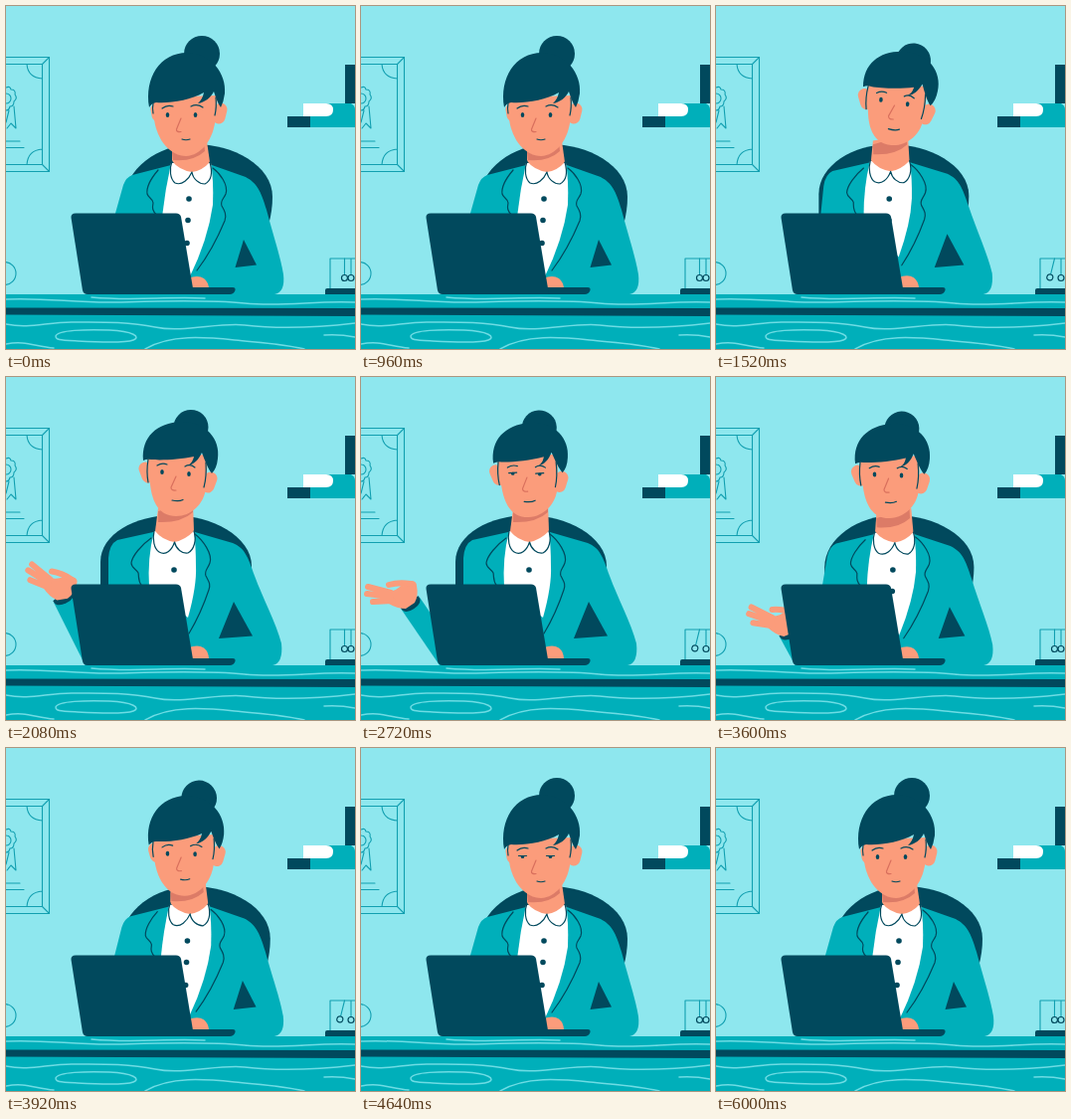
Recreate the animation shown at these times as an HTML page. Size 351 by 345 pixels, loop 6080 ms.

```html
<!DOCTYPE html>
<html lang="en">
<head>
<meta charset="utf-8">
<title>At the desk</title>
<style>
  html, body { margin: 0; width: 100%; height: 100%; overflow: hidden; background: #8ee7ee; }
  svg { display: block; width: 351px; height: 345px; }
  path { stroke-linecap: round; stroke-linejoin: round; }
  .dark { fill: #01495d; }
  .teal { fill: #00afba; }
  .skin { fill: #fb9c7b; }
  .shade { fill: #dc7b67; }
  .white { fill: #fff; }
  .line { fill: none; stroke: #01495d; stroke-width: 1.2; }
  .thin { fill: none; stroke: #129fb0; stroke-width: 1.1; }
  .grain { fill: none; stroke: #6ddce4; stroke-width: 1.5; }
  .nose { fill: none; stroke: #d9705d; stroke-width: 1.2; }
  .ear { fill: none; stroke: #fb9c7b; stroke-width: 13; }
  .button { fill: none; stroke: #01495d; stroke-width: 5.6; }
  .finger { fill: none; stroke: #fb9c7b; stroke-width: 6; }
</style>
</head>
<body>
<svg viewBox="0 0 351 345">
  <!-- certificate and globe -->
  <g class="thin">
    <path d="M0 51.500H43.500V166.500H0M0 58.500H36.500V159.500H0M36.500 58.500L43.500 51.500M36.500 159.500L43.500 166.500M21 58.500Q22 72 36.500 73M21 159.500Q22 145 36.500 144"/>
    <path d="M0 82q4-2 5 2q5 0 4 5q3 4-1 7q0 5-4 5q-1 4-4 4M3 105L0 117M8 101L10 123L5 118L1 123M0 136H14M0 142.500H18"/>
    <circle cx="0" cy="93" r="5"/>
    <circle cx="-1.500" cy="269" r="11.500"/>
  </g>
  <!-- shelf -->
  <path class="dark" d="M341 59H351V98H341ZM283 111H307V122H283Z"/>
  <path class="teal" d="M306 111H351V122H306ZM322 98H347Q351 100 351 104V111H322Z"/>
  <path class="white" d="M299 98H322Q329 98 329 104.500T322 111H299Z"/>
  <!-- cradle -->
  <path class="thin" d="M326 284V254H351M347 254V270"/>
  <circle class="line" cx="347" cy="273.500" r="3"/>
  <g id="ball">
    <path class="thin" d="M340.500 254V270"/>
    <circle class="line" cx="340.500" cy="273.500" r="3"/>
  </g>
  <path class="dark" d="M323 284H351V290H321V286Q321 284 323 284Z"/>

  <g id="body"></g>
  <g id="head"></g>
  <path id="sleeve" fill="none" stroke="#00afba" stroke-width="22" style="stroke-linecap:butt"/>
  <path id="cuff" class="dark" d="M-2 -11Q6 -11 6 0T-2 11Q-6 0 -2 -11Z"/>
  <g id="hand">
    <path class="skin" d="M6 -18Q8 -8 4 -1L-5 5Q-14 5 -22 0L-26 -11Q-12 -13 -8 -21L2 -23Q6 -22 6 -18Z"/>
    <path class="finger" d="M-20 -11L-43 -17M-20 -7L-44 -10M-18 -3L-38 -2M0 -20Q-12 -22 -22 -19"/>
  </g>
  <path id="typing" class="skin" d="M183 274Q193 270 199 274Q204 278 204 285H183Z"/>

  <!-- laptop -->
  <path class="dark" d="M84 283H228Q231 283 230.500 286Q229 290 225 290H84Z"/>
  <path class="dark" d="M70 208.500H171Q175 208.500 176 212L189 290H82Q78 290 77 286L65.500 213Q65 208.500 70 208.500Z"/>

  <!-- desk -->
  <path class="teal" d="M0 290H351V345H0Z"/>
  <path class="dark" d="M0 303.500L351 304V312L0 310.500Z"/>
  <g class="grain">
    <path d="M0 295C40 293 70 299 110 298S200 295 240 299S310 296 351 298M86 293C130 297 160 292 200 294"/>
    <path d="M50 332C52 326 80 325 104 326S136 333 128 336S90 338 72 337S50 336 50 332Z"/>
    <path d="M0 320C24 325 40 318 66 318S122 317 150 323S214 318 240 321S300 325 351 319M0 340C20 336 30 343 48 344M140 345C165 330 200 333 230 336S280 340 300 345M320 331Q336 330 351 333"/>
  </g>
</svg>
<script>
const LOOP = 6080;
const $ = id => document.getElementById(id);
const clamp = v => Math.max(0, Math.min(1, v));
const parts = [];

// Blend two paths that share the same commands; arc flags stay whole.
function mix(a, b, t) {
  const to = b.match(/-?[\d.]+/g);
  let i = 0;
  return a.replace(/-?[\d.]+/g, n => +(+n + (to[i++] - n) * t).toFixed(2));
}

function part(group, style, from, to) {
  const el = document.createElementNS("http://www.w3.org/2000/svg", "path");
  el.setAttribute("class", style);
  $(group).append(el);
  parts.push({ el, group, from, to });
  return el;
}

// Body: leaning over the keyboard, then sitting back.
part("body", "dark",
  "M119 215V195C119 165 152 139 190 139S268 160 268 192Q268 206 264 220Z",
  "M95 215V186C95 158 130 139 168 139S247 160 247 190Q247 204 243 220Z");
part("body", "teal",
  "M166 160L127 170Q121 172 118 180L109 212L112 290H270Q281 288 279 270C277 255 268 228 262 205C256 185 252 178 241 172L207 160Z",
  "M148 156L112 164Q104 168 103 182L103 212L106 290H268Q279 288 277 268C272 248 258 222 250 200C243 180 240 172 228 167L190 156Z");
part("body", "white",
  "M166 158Q160 185 157 212L185 272Q203 235 208 200Q209 175 206 158Z",
  "M149 155Q142 182 144 212L183 242Q192 210 191 190Q191 170 189 155Z");
part("body", "skin",
  "M167 142L202 136L205 157Q197 166 187 167Q174 165 167 156Z",
  "M153 132L188 126L189 155Q180 164 169.500 166Q157 164 150 155Z");
part("body", "shade",
  "M167 147L199 137L200 146Q188 157 168 155Z",
  "M153 135L188 126L188 136Q176 147 153 146Z");
part("body", "line",
  "M167 156C164 164 165 174 170 178C177 181 184 174 187 167C188 174 194 179 200 179C206 176 208 168 205 157",
  "M149 155C147 163 149 173 154 176C161 180 167 174 169.500 166C171 173 177 178 183 177C189 174 192 164 189 155");
part("body", "line",
  "M153 165C147 172 141 182 142 189C143 193 148 194 148 198C147 203 147 206 152 211",
  "M146 162C136 169 127 180 126 187C126 192 131 193 133 197C134 201 132 204 137 211");
part("body", "line",
  "M208 163C215 168 224 180 221 189C219 194 215 196 217 201C220 206 222 210 220 216Q208 245 192 266",
  "M190 158C198 164 208 178 205 187C203 193 199 195 201 200C204 206 206 208 204 214Q196 238 184 258");
part("body", "button",
  "M184 194h.01M183 215.500h.01M182 238.500h.01",
  "M169 194h.01M169 215.500h.01M169 238.500h.01");
part("body", "dark",
  "M239 235L230.500 263L252 260.500Z",
  "M229 226L214 263L248 260.500Z");

// Head: looking down, then facing forward.
const bun = part("head", "dark",
  "M179 48A18 18 0 1 1 215 48A18 18 0 1 1 179 48Z",
  "M168.500 50.500A17.500 17.500 0 1 1 203.500 50.500A17.500 17.500 0 1 1 168.500 50.500Z");
part("head", "ear", "M152 104L153 110", "M140 92L143 100");
part("head", "ear", "M216 104L214 112", "M206 102L203 110");
part("head", "skin",
  "M147 92L149 114C152 136 166 151 181 151C196 150 207 136 210 118L213 90Z",
  "M142 80L145 108C147 126 154 140 171 140C186 140 199 128 201 112L203 78Z");
part("head", "dark",
  "M144 102C139 72 155 47 182 47C206 47 222 68 220 88Q219 96 216 102C213 98 211 92 209 86C206 92 200 97 193 98C196 95 198 92 199 87C185 95 165 98 151 97Q146 98 144 102Z",
  "M138 84C136 60 152 46 176 45C200 44 216 62 213 82Q212 92 207 97C203 92 200 84 197 76C194 83 189 88 183 89C187 86 188 84 189 80C175 83 155 84 146 83Q142 82 138 84Z");
part("head", "line",
  "M148 98Q147 102 148 108M211 92Q212 102 210 110",
  "M143 83Q141 95 143 106M201 86Q202 100 199 111");
part("head", "line",
  "M157 103Q162 99 168 101M186 101Q192 98 198 102",
  "M152 89Q157 86 162 88M180 90Q185 87 190 91");
part("head", "nose",
  "M176 113L171.500 124Q171 127 176 126.500",
  "M171 100L166 111Q166 114.500 171 114");
part("head", "line", "M177 134Q181 135.500 185 134", "M167 124Q174 125.500 178 123.500");
const OPEN_EYES = [[162.500, 109.500, 157, 95.500], [190.500, 109.500, 184, 97.500]];
const eyes = OPEN_EYES.map(() => part("head", "dark", "", ""));
const lids = OPEN_EYES.map(() => part("head", "line", "", ""));

// time, lean, lift, head x, y, tilt, bun drop, wrist x, y, hand angle
const REST = [0, 0, 0, 0, 0, 0, 122, 268, 10];
const OFFER = [1, 1, -2, 1, -3, 0, 50, 228, 0];
const keys = [
  [0, ...REST],
  [1120, ...REST],
  [1520, .65, 1, 5, 0, 5, 3, 122, 266, 20],
  [1920, .95, 1, 2, 0, 2, 1, 82, 238, 32],
  [2080, 1, 1, 0, 0, 0, 0, 58, 222, 25],
  [2560, ...OFFER],
  [3240, ...OFFER],
  [3600, .41, 1, 4, 2, -2, 0, 74, 257, 12],
  [3840, .15, .5, 3, 2, -1, 0, 118, 268, 10],
  [4240, ...REST],
  [LOOP, ...REST]
];

function slope(i, c) {
  if (i < 1 || i > keys.length - 2) return 0;
  const [p, q, r] = keys.slice(i - 1, i + 2);
  const a = (q[c] - p[c]) / (q[0] - p[0]), b = (r[c] - q[c]) / (r[0] - q[0]);
  return a * b <= 0 ? 0 : 2 * a * b / (a + b);
}

// Smooth curve through the keys without overshoot.
function poseAt(t) {
  const i = Math.max(0, keys.findIndex((k, n) => n && t <= k[0]) - 1);
  const a = keys[i], b = keys[i + 1], d = b[0] - a[0];
  const s = (t - a[0]) / d, e = s * s * (3 - 2 * s);
  return REST.map((_, n) => {
    const c = n + 1;
    return a[c] + (b[c] - a[c]) * e
      + d * s * (1 - s) * ((1 - s) * slope(i, c) - s * slope(i + 1, c));
  });
}

const blinkAt = t => Math.max(...[460, 2820, 4740].map(m => clamp(1.4 - Math.abs(t - m) / 110)));

function drawEyes(lift, blink) {
  OPEN_EYES.forEach(([ax, ay, bx, by], i) => {
    const x = ax + (bx - ax) * lift, y = ay + (by - ay) * lift;
    const ry = 2.5 - 2 * blink;
    eyes[i].setAttribute("d", `M${x - 1.8} ${y}a1.8 ${ry} 0 1 1 3.6 0a1.8 ${ry} 0 1 1 -3.6 0Z`);
    lids[i].setAttribute("d", `M${x - 4} ${y - 2 + 2 * blink}h8`);
    lids[i].setAttribute("opacity", blink > .2 ? 1 : 0);
  });
}

function draw(t) {
  const [lean, lift, hx, hy, tilt, drop, wx, wy, angle] = poseAt(t);
  for (const p of parts)
    if (p.from) p.el.setAttribute("d", mix(p.from, p.to, p.group === "body" ? lean : lift));
  $("head").setAttribute("transform", `translate(${hx} ${hy}) rotate(${tilt} 172 140)`);
  bun.setAttribute("transform", `translate(0 ${drop})`);
  drawEyes(lift, blinkAt(t));

  const arm = Math.atan2(288 - wy, 91 - wx) * 180 / Math.PI;
  $("sleeve").setAttribute("d", `M91 288L${wx} ${wy}`);
  $("cuff").setAttribute("transform", `translate(${wx} ${wy}) rotate(${arm})`);
  $("hand").setAttribute("transform", `translate(${wx} ${wy}) rotate(${angle})`);
  $("typing").setAttribute("transform", `translate(0 ${-.8 + .8 * Math.cos(t / 320 * 2 * Math.PI)})`);

  const swing = Math.max(0, Math.sin(t / 1200 * 2 * Math.PI));
  $("ball").setAttribute("transform", `rotate(${14 * swing} 340.5 254)`);
}

function tick() {
  draw(performance.now() % LOOP);
  requestAnimationFrame(tick);
}
tick();
</script>
</body>
</html>
```
